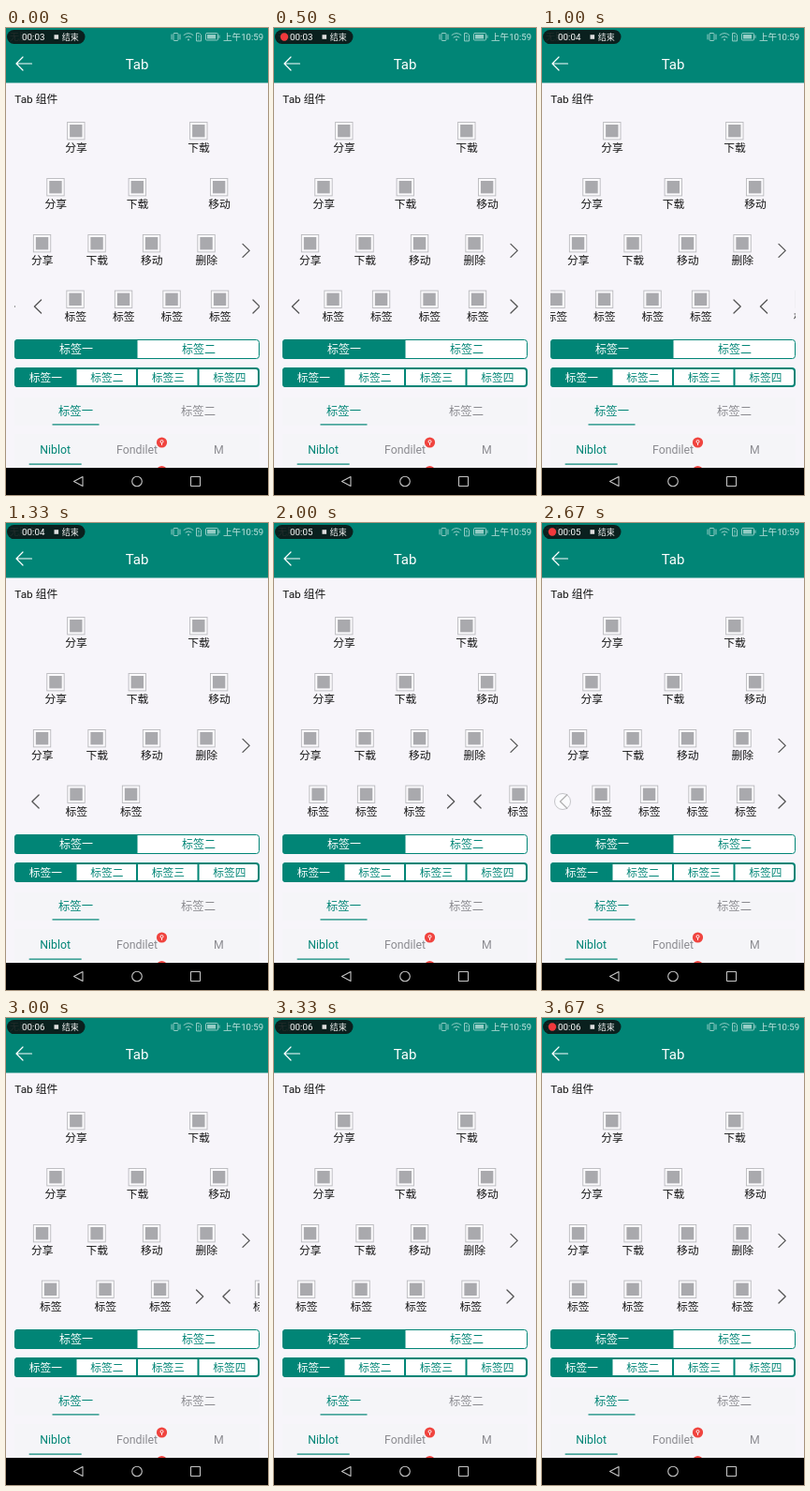
These frames come from a looping animation (280 by 498 pixels, 3.84 s). An HTML page:

```html
<!DOCTYPE html>
<html lang="zh-CN">
<head>
<meta charset="utf-8">
<title>Tab</title>
<style>
  html, body { margin: 0; width: 100%; height: 100%; overflow: hidden; background: #f7f5fa; }
  svg { display: block; width: 280px; height: 498px; }
  text { font-family: Roboto, "Noto Sans CJK SC", "Noto Sans CJK", sans-serif; }
  .line { fill: none; stroke-linecap: round; stroke-linejoin: round; }
</style>
</head>
<body>
<svg id="stage" viewBox="0 0 280 498">
  <defs>
    <clipPath id="window"><rect x="9" y="275" width="262" height="45"/></clipPath>
  </defs>
  <rect width="280" height="498" fill="#f7f5fa"/>
  <rect width="280" height="58.500" fill="#018576"/>

  <g id="carrier"></g>
  <g id="status">
    <rect x="1" y="2" width="83.500" height="15" rx="7.500" fill="#0c1615" fill-opacity=".9"/>
    <circle id="dot" cx="11" cy="9.500" r="4.200" fill="#f0393c"/>
    <rect x="51.500" y="7.200" width="4.600" height="4.600" fill="#ddd"/>
    <g class="line" stroke="#93ccc4">
      <rect x="179" y="5.500" width="5" height="8" rx="1"/>
      <path d="M177 7v5M186 7v5M190 7.500q5-4 10 0M192 10q3-2.500 6 0"/>
      <path d="M203.500 13.500v-8h3l2 2v6zM206 8v2M206 12v.2"/>
      <rect x="213.500" y="5.500" width="13" height="7.500" rx="1"/>
      <path d="M228 8v2.500"/>
    </g>
    <circle cx="195" cy="12.500" r="1" fill="#93ccc4"/>
    <rect x="215" y="7" width="9" height="4.500" fill="#93ccc4"/>
  </g>
  <path class="line" d="M27.500 38H11M18 31L11 38L18 45" stroke="#fff" stroke-width="1.200"/>

  <g id="rows"></g>
  <g clip-path="url(#window)"><g id="track"></g></g>
  <g fill="#f5f5f8">
    <rect x="9" y="394" width="262" height="30"/>
    <rect x="9" y="433" width="262" height="36"/>
  </g>
  <g id="tabs"></g>

  <circle cx="166.500" cy="442" r="5.600" fill="#f0443f"/>
  <circle cx="166.500" cy="441" r="1.500" fill="none" stroke="#fff" stroke-width=".9"/>
  <path d="M166.500 442.500v2.500" stroke="#fff" stroke-width=".9"/>
  <circle cx="166.500" cy="472.500" r="5.600" fill="#f0443f"/>

  <rect y="469" width="280" height="29" fill="#000"/>
  <g class="line" stroke="#c4c4c4" stroke-width="1.100">
    <path d="M82 478.500v10L72.500 483.500z"/>
    <circle cx="140" cy="483.500" r="5.300"/>
    <rect x="197.500" y="478.500" width="10" height="10" rx=".5"/>
  </g>
  <circle id="touch" r="8.500" fill="#fff" fill-opacity=".55" stroke="#c4c4c8"/>
</svg>
<script>
const $ = id => document.getElementById(id);
const TEAL = '#018576', GRAY = '#8b8b90', INK = '#161616';
const LEFT = 9, WIDTH = 262, ARROW = 28;

function add(parent, tag, attrs) {
  const el = document.createElementNS('http://www.w3.org/2000/svg', tag);
  for (const k in attrs) el.setAttribute(k, attrs[k]);
  return parent.appendChild(el);
}

// x is the centre unless an anchor is given; y is the middle of the line
function label(parent, str, x, y, fill, size = 12, extra = {}) {
  const el = add(parent, 'text', {
    x, y: y + size * .37, fill, 'font-size': size, 'text-anchor': 'middle', ...extra
  });
  el.textContent = str;
  return el;
}

function square(parent, x, y, size, attrs) {
  add(parent, 'rect', { x: x - size / 2, y: y - size / 2, width: size, height: size, ...attrs });
}

function item(parent, x, y, str) {
  square(parent, x, y, 18.4, { fill: '#fbfafc', stroke: '#b9b9bd', 'stroke-width': .9 });
  square(parent, x, y, 13.4, { fill: '#a9a9ad' });
  label(parent, str, x + .3, y + 18.3, INK, 11.8);
}

function chevron(parent, x, y, dir) {
  add(parent, 'path', {
    class: 'line', d: `M${x - 3.6 * dir} ${y - 7}L${x + 3.6 * dir} ${y}L${x - 3.6 * dir} ${y + 7}`,
    stroke: '#555', 'stroke-width': 1.3
  });
}

// A page of tabs; arrows take a fixed width, items share the rest
function page(parent, x, y, names, { prev, next, slots = names.length } = {}) {
  const start = x + (prev ? ARROW : 0);
  const step = (WIDTH - (prev ? ARROW : 0) - (next ? ARROW : 0)) / slots;
  names.forEach((n, i) => item(parent, start + step * (i + .5) + .3, y, n));
  if (prev) chevron(parent, x + ARROW / 2, y + 7.7, -1);
  if (next) chevron(parent, x + WIDTH - ARROW / 2 - .4, y + 7.7, 1);
}

function segments(parent, y, names, size, border) {
  const w = WIDTH / names.length;
  add(parent, 'rect', {
    x: LEFT + border / 2, y: y + border / 2, width: WIDTH - border, height: 21 - border,
    rx: 3, fill: '#fff', stroke: TEAL, 'stroke-width': border
  });
  add(parent, 'rect', { x: LEFT, y, width: w, height: 21, rx: 3.5, fill: TEAL });
  add(parent, 'rect', { x: LEFT + w - 6, y, width: 6, height: 21, fill: TEAL });
  names.forEach((n, i) => {
    if (i) add(parent, 'rect', { x: LEFT + w * i - border / 2, y, width: border, height: 21, fill: TEAL });
    label(parent, n, LEFT + w * (i + .5) + .6, y + 10.5, i ? TEAL : '#fff', size);
  });
}

function underlined(parent, y, names, lineY, lineW) {
  const w = WIDTH / names.length;
  names.forEach((n, i) => label(parent, n, LEFT + w * (i + .5), y, i ? GRAY : TEAL, 12.3));
  add(parent, 'rect', { x: LEFT + w / 2 - lineW / 2, y: lineY, width: lineW, height: 1.2, fill: TEAL });
}

const status = $('status'), rows = $('rows'), track = $('track'), tabs = $('tabs');
label($('carrier'), '无服务', 4, 9.5, '#e3f4f1', 10, { 'text-anchor': 'start' });
const clock = label(status, '00:03', 17, 9.5, '#fff', 9.8, { 'text-anchor': 'start' });
label(status, '结束', 68.7, 9.5, '#eee', 9);
label(status, '上午10:59', 253.5, 9.5, '#c5e5e0', 9.6);
label(rows, 'Tab', 140, 38.5, '#fff', 15);
label(rows, 'Tab 组件', 9.3, 75.5, INK, 11.8, { 'text-anchor': 'start' });

page(rows, LEFT, 109.7, ['分享', '下载']);
page(rows, LEFT, 169.7, ['分享', '下载', '移动']);
page(rows, LEFT, 229.7, ['分享', '下载', '移动', '删除'], { next: true });

const four = Array(4).fill('标签');
page(track, LEFT, 289.3, four, { next: true });
page(track, LEFT + WIDTH, 289.3, four, { prev: true, next: true });
page(track, LEFT + 2 * WIDTH, 289.3, four.slice(2), { prev: true, slots: 4 });

segments(tabs, 332, ['标签一', '标签二'], 12, 1);
segments(tabs, 362, ['标签一', '标签二', '标签三', '标签四'], 11.7, 2);
underlined(tabs, 408.6, ['标签一', '标签二'], 422.3, 50);
underlined(tabs, 449, ['Niblot', 'Fondilet', 'M'], 464.5, 56);

// The screen refreshes six times a second
const LOOP = 3840, RATE = 6, LAST = 22;
// Swipes as [tick, scroll offset]
const swipes = [
  [0, 251], [1, 261], [2, 262], [5, 262], [6, 310], [7, 436], [8, 515.5], [9, 524],
  [10, 524], [11, 516], [12, 329.5], [13, 284], [14, 267], [15, 262], [17, 262],
  [18, 49.5], [19, 18], [20, 4], [21, 0], [LAST, 0]
];
const touches = { 5: [247, 304.5], 16: [22, 297] };

function scrollAt(tick) {
  const i = Math.max(1, swipes.findIndex(p => p[0] >= tick));
  const [a, x] = swipes[i - 1], [b, y] = swipes[i];
  return x + (y - x) * (tick - a) / (b - a);
}

function show(el, on) {
  el.setAttribute('visibility', on ? 'visible' : 'hidden');
}

const origin = performance.now();
function draw() {
  const t = (performance.now() - origin) % LOOP;
  const tick = Math.min(LAST, Math.floor(t * RATE / 1000 + .025));
  track.setAttribute('transform', `translate(${-scrollAt(tick)} 0)`);

  clock.textContent = '00:0' + (3 + Math.floor(tick / RATE));
  show($('dot'), tick % RATE >= RATE / 2);

  const at = touches[tick], touch = $('touch');
  show(touch, at);
  if (at) touch.setAttribute('transform', `translate(${at})`);
  requestAnimationFrame(draw);
}
draw();
</script>
</body>
</html>
```
